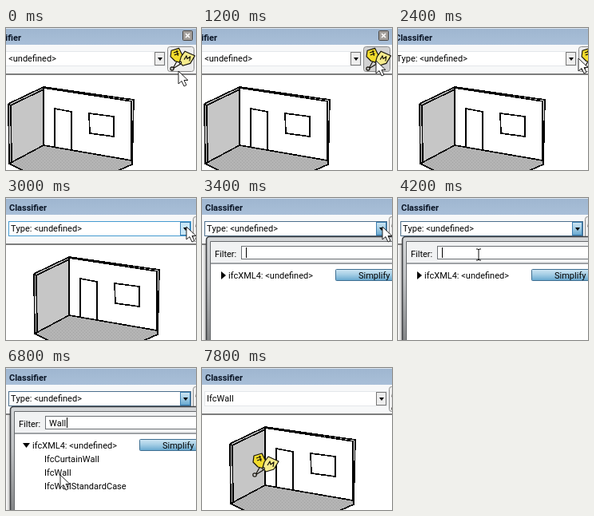
Animation of 238 by 178 pixels, one loop 8000 ms. Source, as an HTML page:

```html
<!DOCTYPE html>
<html lang="en">
<head>
<meta charset="utf-8">
<title>Classifier</title>
<style>
  html, body { margin: 0; width: 100%; height: 100%; overflow: hidden; background: #fff; }
  svg { display: block; width: 100vw; height: 100vh; }
  text { font: 11px Roboto, sans-serif; font-kerning: none; fill: #000; white-space: pre; }
  .title { font-weight: bold; fill: #0a1526; }
  .edge { fill: none; stroke: #000; stroke-width: 1.7; shape-rendering: crispEdges; }
</style>
</head>
<body>
<svg viewBox="0 0 238 178">
  <defs>
    <linearGradient id="bar" x2="0" y2="1">
      <stop stop-color="#9fb6d0"/><stop offset="1" stop-color="#a9bfd8"/>
    </linearGradient>
    <linearGradient id="blue" x2="0" y2="1">
      <stop stop-color="#cfe6f3"/><stop offset=".45" stop-color="#a6cfe6"/><stop offset="1" stop-color="#67a8cf"/>
    </linearGradient>
    <linearGradient id="frame" gradientUnits="userSpaceOnUse" x1="0" x2="0" y1="48" y2="178">
      <stop stop-color="#d6d8da"/><stop offset=".4" stop-color="#c2c4c6"/><stop offset="1" stop-color="#858789"/>
    </linearGradient>
    <linearGradient id="shadow" x2="1" y2="0">
      <stop stop-color="#fff"/><stop offset="1" stop-color="#b4b4b4"/>
    </linearGradient>
    <pattern id="floor" width="4" height="4" patternUnits="userSpaceOnUse">
      <path d="M0 0h4v4H0z" fill="#b4b4b4"/><path d="M0 0h1v1H0zM2 2h1v1H2z" fill="#a2a2a2"/>
    </pattern>
    <!-- pair of tags tied at the origin -->
    <g id="tags" stroke="#14110a" stroke-width="1.2" stroke-linejoin="round">
      <path d="M1 0L7-11M1 0L14-8" fill="none"/>
      <path d="M-1-24L9-27L15-15L11-8L4-10L-2-16Z" fill="#f3dc2c"/>
      <path d="M2-21l6-2m-5 5l6-2m-3-4l2 7" fill="none"/>
      <path d="M17-23L30-17L24-7L14-4L10-9L12-16Z" fill="#f5eb8c"/>
      <path d="M16-12l3-5l1 4l4-3l-1 6" fill="none"/>
      <circle cx="11" cy="-8" r="1.3" fill="#fff"/>
      <circle r="2.2" fill="#ccc"/>
    </g>
  </defs>

  <g id="scene">
    <path d="M35 95L79 75V147L37 169Z" fill="#c6c6c6"/>
    <path d="M37 169L79 147L189 166V171L174 178L162 184H62L52 178Z" fill="url(#floor)"/>
    <path class="edge" d="M35 95L79 74L192 90L190 171L174 178L162 184M190 92L79 75M35 95L38 97L79 77M79 75V147L189 166V92M35 95L36 170L79 147M38 97L39 168M36 170L52 178L62 184"/>
    <path class="edge" d="M93 149V101L114 105V152M136 107L167 111V136L137 132Z"/>

    <path d="M-4 0H270V59H-4Z" fill="#f7f8f9"/>
    <path d="M-4 0H270V1H-4Z" fill="#dde5ee"/>
    <path d="M-4 1H270V21H-4Z" fill="url(#bar)"/>
    <path d="M-4 58H270" stroke="#555" stroke-width="1.6"/>
    <text class="title" x="4" y="16">Classifier</text>
    <rect x="253.5" y="3.5" width="12" height="12" rx="1" fill="#a39f9b" stroke="#494643"/>
    <path d="M257 7l5 5m0-5l-5 5" stroke="#fff" stroke-width="1.6"/>

    <rect id="combo" x="3.5" y="29.5" width="228" height="18" fill="#fff"/>
    <text id="value" y="42"></text>
    <rect id="drop" x="218.5" y="30.5" width="12" height="16"/>
    <path d="M222 37h6l-3 4z" fill="#000"/>
    <rect id="tool" x="234.5" y="23.5" width="33" height="31" rx="3" stroke="#8b8b8b"/>
    <use href="#tags" transform="translate(240 51) scale(.95)"/>
  </g>

  <g id="popup">
    <path d="M0 59H6V178H0Z" fill="url(#shadow)"/>
    <rect x="5.5" y="48.5" width="260" height="160" rx="4" fill="url(#frame)" stroke="#3f4144" stroke-width="1.6"/>
    <path d="M10.5 178V54.5H238" fill="none" stroke="#66696c"/>
    <path d="M11 55H238V82H11Z" fill="#f1f2f3"/>
    <path d="M11 82H238V178H11Z" fill="#fff"/>
    <path d="M11 82H238" stroke="#808488" stroke-width="1.4"/>
    <text x="16" y="74">Filter:</text>
    <rect x="49.5" y="60.5" width="200" height="16" fill="#fff" stroke="#6c7074"/>
    <text id="typed" x="54" y="73"></text>
    <path id="caret" d="M0 62V75" stroke="#000"/>
    <path id="arrow" fill="#000"/>
    <text x="33" y="101">ifcXML4: &lt;undefined&gt;</text>
    <rect x="167.5" y="89.5" width="90" height="14" rx="1" fill="url(#blue)" stroke="#3f6f92"/>
    <text x="196" y="101">Simplify</text>
    <g id="rows"></g>
  </g>

  <g id="pointer">
    <path id="arrowCursor" d="M0 0V16L4 12.5L7 19L10 17.5L7 11.5H12Z" fill="#fff" stroke="#222"/>
    <path id="beamCursor" d="M-3-7H-1L0-6L1-7H3M0-6V6M-3 7H-1L0 6L1 7H3" fill="none" stroke="#111"/>
    <use id="tagCursor" href="#tags"/>
  </g>
</svg>
<script>
const LOOP = 8000, STEP = 200, OPEN = 3400, CLOSE = 7000;
const el = id => document.getElementById(id);
const set = (id, attrs) => Object.entries(attrs).forEach(([k, v]) => el(id).setAttribute(k, v));
const show = (id, on) => { el(id).style.display = on ? '' : 'none'; };
const label = (id, s) => { el(id).textContent = s; };

// [time, x, y] in panel coordinates
const pointerKeys = [
  [0, 248, 54], [600, 250, 41], [1600, 250, 41], [2000, 242, 39], [2800, 226, 36],
  [3400, 226, 36], [4000, 101, 71], [5400, 101, 71], [6000, 68, 134], [7000, 68, 134], [7200, 66, 134]
];
const panKeys = [[1600, -32], [2800, 0]];

function at(keys, t) {
  const i = keys.findIndex(k => k[0] > t);
  if (i === 0) return keys[0].slice(1);
  if (i < 0) return keys[keys.length - 1].slice(1);
  const a = keys[i - 1], b = keys[i], p = (t - a[0]) / (b[0] - a[0]), e = p * p * (3 - 2 * p);
  return a.slice(1).map((v, k) => v + (b[k + 1] - v) * e);
}

const entries = ['IfcCurtainWall', 'IfcWall', 'IfcWallStandardCase', 'IfcWasteTerminal'];
const rows = entries.map((name, i) => {
  const row = document.createElementNS('http://www.w3.org/2000/svg', 'text');
  row.textContent = name;
  row.setAttribute('x', 48);
  row.setAttribute('y', 118 + 17 * i);
  el('rows').append(row);
  return row;
});

function draw(t) {
  const pan = Math.round(at(panKeys, t)[0]);
  const [x, y] = at(pointerKeys, t).map(Math.round);
  const open = t >= OPEN && t < CLOSE, done = t >= CLOSE;
  const overDrop = t >= 2600 && t < OPEN;
  const overTool = t >= 400 && t < 2400;

  set('scene', { transform: `translate(${pan} 0)` });
  set('pointer', { transform: `translate(${x + pan} ${y})` });
  set('combo', { stroke: overDrop ? '#459bd0' : open ? '#4c6f8c' : '#e4e7ea' });
  set('drop', {
    fill: open ? 'url(#blue)' : overDrop ? '#c9e8f8' : '#eee',
    stroke: open || overDrop ? '#3c7fb1' : '#777'
  });
  set('tool', { fill: overTool ? '#d2d2d2' : '#eeeeee' });
  set('value', { x: 6 });
  label('value', done ? 'IfcWall' : 'Type: <undefined>');

  // The filter text narrows the list as it is typed.
  show('popup', open);
  const count = Math.max(0, Math.min(4, Math.floor((t - 4200) / 200)));
  const matches = count < 2 ? 0 : count === 2 ? 4 : 3;
  const typing = t > 4200 && t < 5200;
  label('typed', 'Wall'.slice(0, count));
  const caretX = 55.5 + (open ? Math.round(el('typed').getComputedTextLength()) : 0);
  set('caret', { transform: `translate(${caretX} 0)` });
  show('caret', typing || (t + 1900) % 1200 < 600);
  set('arrow', { d: matches ? 'M21 94h9l-4.5 6z' : 'M24 92v10l6-5z' });
  rows.forEach((row, i) => { row.style.display = i < matches ? '' : 'none'; });

  const beam = t >= 4000 && t < 5600;
  show('beamCursor', beam);
  show('tagCursor', done);
  show('arrowCursor', !beam && !done);
}

function tick() {
  draw(Math.floor(performance.now() % LOOP / STEP) * STEP);
  requestAnimationFrame(tick);
}
tick();
</script>
</body>
</html>
```
